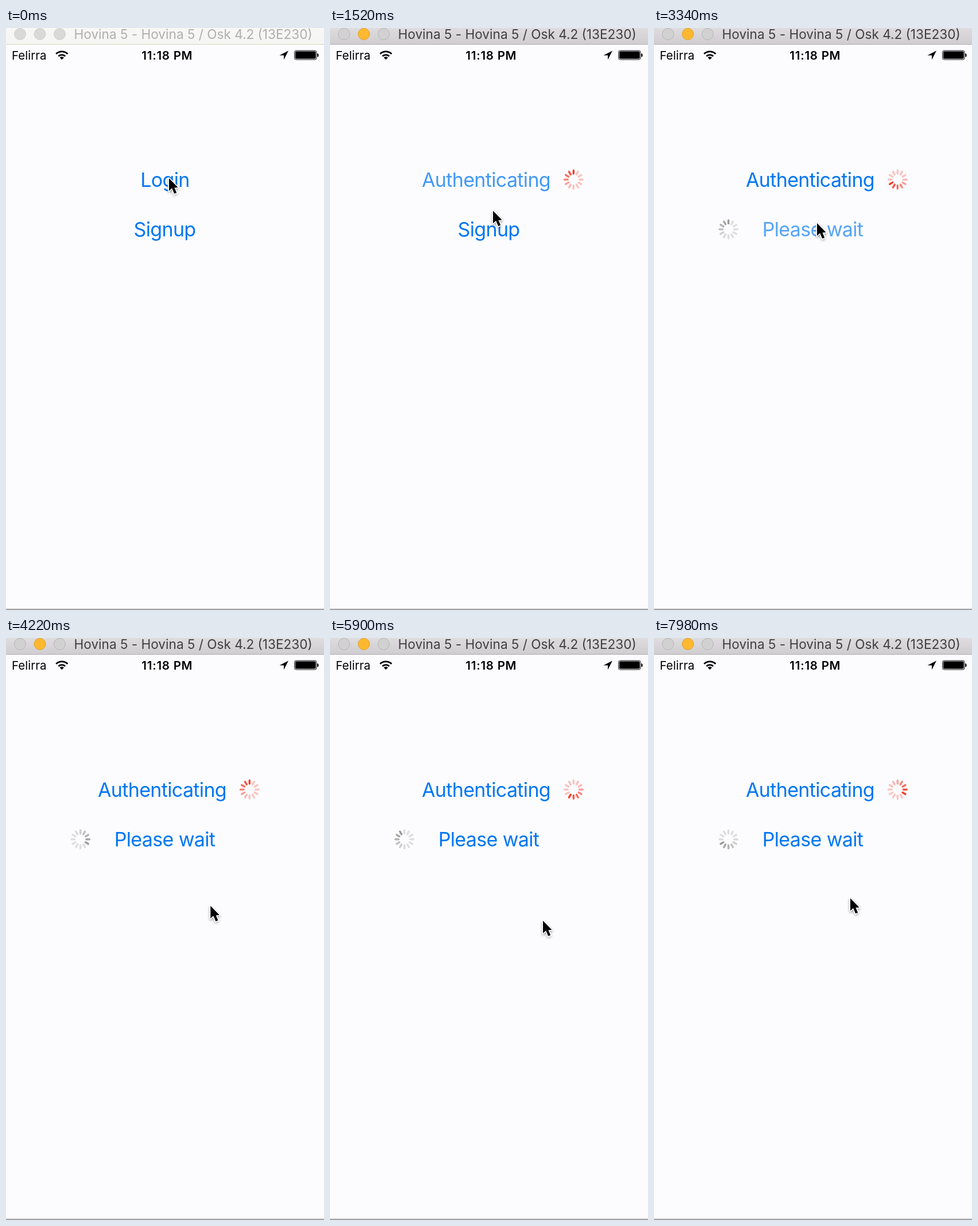
Animation of 554 by 1011 pixels, one loop 8000 ms. Source, as an HTML page with a canvas:

```html
<!DOCTYPE html>
<html lang="en">
<head>
<meta charset="utf-8">
<style>
  html, body { margin: 0; width: 100%; height: 100%; overflow: hidden; background: #fcfcff; }
  canvas { display: block; }
</style>
</head>
<body>
<canvas id="stage" width="554" height="1011"></canvas>
<script>
const ctx = document.getElementById('stage').getContext('2d');
const LOOP = 8000, FADE = 900, SPIN = 2750;
const LOGIN_TAP = 20, SIGNUP_TAP = 1895;
const BLUE = '#0076f2', BLACK = '#000', WHITE = '#fff';

const progress = (t, start, duration) => Math.min(1, Math.max(0, (t - start) / duration));
const smooth = p => p * p * (3 - 2 * p);
const easeOut = p => 1 - (1 - p) ** 3;

// The pointer slides from Login to Signup, drifts away, then returns a little.
function pointerAt(t) {
  const down = smooth(progress(t, 1220, 460));
  const away = easeOut(progress(t, 3600, 1390));
  const back = smooth(progress(t, 6060, 420));
  return [284 + 87 * away - 29 * back, 261 + 78 * down + 152 * away - 39 * back];
}

function label(text, x, y, size, color, { weight = 400, align = 'left', spacing = 0, alpha = 1 } = {}) {
  ctx.globalAlpha = alpha;
  ctx.font = `${weight} ${size}px Inter, Roboto, sans-serif`;
  ctx.letterSpacing = spacing + 'px';
  ctx.textAlign = align;
  ctx.fillStyle = color;
  ctx.fillText(text, x, y);
  ctx.globalAlpha = 1;
}

function roundRect(x, y, w, h, r) {
  ctx.beginPath();
  ctx.roundRect(x, y, w, h, r);
}

function titleBar(active) {
  const shade = ctx.createLinearGradient(0, 0, 0, 28);
  shade.addColorStop(0, active ? '#dedcde' : '#f7f7f6');
  shade.addColorStop(1, active ? '#cfcdd0' : '#f5f5f4');
  ctx.fillStyle = shade;
  ctx.fillRect(0, 0, 554, 28);
  ctx.fillStyle = active ? '#b0aeb2' : '#d6d6bc';
  ctx.fillRect(0, 28, 554, 1);

  for (let i = 0; i < 3; i++) {
    const lit = active && i === 1;
    ctx.beginPath();
    ctx.arc(24.5 + 34.5 * i, 10.5, 10, 0, 2 * Math.PI);
    ctx.fillStyle = lit ? '#fdb830' : active ? '#d2d1d2' : '#d9d9d8';
    ctx.fill();
    ctx.strokeStyle = lit ? '#e2a02c' : active ? '#b5b4b5' : '#cfcfce';
    ctx.lineWidth = 1;
    ctx.stroke();
  }
  label('Hovina 5 - Hovina 5 / Osk 4.2 (13E230)', 118.5, 19, 22.6, active ? '#403e40' : '#b0afab');
}

function wifi(x, y) {
  ctx.lineWidth = 2.8;
  ctx.lineCap = 'butt';
  for (let r = 2.6; r < 15; r += 5.8) {
    ctx.lineWidth = r < 3 ? 5.2 : 2.8;
    ctx.beginPath();
    ctx.arc(x, y, r, -0.75 * Math.PI, -0.25 * Math.PI);
    ctx.stroke();
  }
}

function locationArrow(x, y) {
  ctx.beginPath();
  ctx.moveTo(x, y);
  ctx.lineTo(x - 15.5, y + 8);
  ctx.lineTo(x - 8, y + 8);
  ctx.lineTo(x - 8, y + 15.5);
  ctx.fill();
}

function battery(x, y) {
  ctx.lineWidth = 0.9;
  roundRect(x, y, 38.6, 15.8, 3);
  ctx.stroke();
  roundRect(x + 1.4, y + 1.4, 35.8, 13, 1.8);
  ctx.fill();
  roundRect(x + 39.8, y + 5, 2.2, 6, [0, 2, 2, 0]);
  ctx.fill();
}

function statusBar() {
  label('Felirra', 10, 54.5, 20.5, BLACK);
  label('11:18 PM', 280.8, 54.5, 20.5, BLACK, { weight: 600, align: 'center', spacing: 0.75 });
  ctx.fillStyle = ctx.strokeStyle = BLACK;
  wifi(97.3, 55);
  locationArrow(492, 39.5);
  battery(502.5, 39.2);
}

function spinner(x, y, color, head) {
  ctx.strokeStyle = color;
  ctx.lineWidth = 3.4;
  ctx.lineCap = 'round';
  for (let age = 0; age < 12; age++) {
    const angle = (head - age) * Math.PI / 6 - Math.PI / 2;
    const c = Math.cos(angle), s = Math.sin(angle);
    ctx.globalAlpha = Math.max(0.3, 1 - age * 0.13);
    ctx.beginPath();
    ctx.moveTo(x + c * 10.2, y + s * 10.2);
    ctx.lineTo(x + c * 15.8, y + s * 15.8);
    ctx.stroke();
  }
  ctx.globalAlpha = 1;
}

// The old title fades out, then the new one fades in.
function button(t, tap, before, after, beforeX, afterX, y) {
  const gone = smooth(progress(t, tap, FADE));
  const shown = smooth(progress(t, tap + FADE, FADE));
  const style = { align: 'center', spacing: -0.65 };
  if (gone < 1) label(before, beforeX, y, 34, BLUE, { ...style, alpha: 1 - gone });
  else label(after, afterX, y, 34, BLUE, { ...style, alpha: shown });
}

// Arrow head with a slanted tail; the outline is the same shape drawn wider.
function arrow(color, grow) {
  ctx.fillStyle = ctx.strokeStyle = color;
  ctx.lineCap = 'butt';
  ctx.beginPath();
  ctx.moveTo(0, 0);
  ctx.lineTo(0, 22);
  ctx.lineTo(5.5, 16.8);
  ctx.lineTo(15.6, 16);
  ctx.closePath();
  ctx.fill();
  if (grow) {
    ctx.lineWidth = grow;
    ctx.stroke();
  }
  ctx.beginPath();
  ctx.moveTo(6, 14);
  ctx.lineTo(11.2 + grow * 0.2, 26 + grow * 0.45);
  ctx.lineWidth = 4.4 + grow;
  ctx.stroke();
}

function pointer(x, y) {
  ctx.save();
  ctx.translate(x, y);
  ctx.lineJoin = 'round';
  ctx.shadowColor = 'rgba(0,0,0,.3)';
  ctx.shadowBlur = 4;
  ctx.shadowOffsetY = 2;
  arrow(WHITE, 3);
  ctx.shadowColor = 'transparent';
  arrow(WHITE, 3);
  arrow(BLACK, 0);
  ctx.restore();
}

function draw(t) {
  ctx.fillStyle = '#fcfcff';
  ctx.fillRect(0, 0, 554, 1011);
  titleBar(t >= LOGIN_TAP);
  statusBar();

  button(t, LOGIN_TAP, 'Login', 'Authenticating', 277, 272, 275.5);
  button(t, SIGNUP_TAP, 'Signup', 'Please wait', 276.5, 276.5, 362);

  const head = Math.floor((t - 1520) * 12 / SPIN + 0.3);
  if (t >= LOGIN_TAP) spinner(424.3, 263.3, '#f63a26', head);
  if (t >= SIGNUP_TAP) spinner(129.7, 349.8, '#999996', head + 4);

  ctx.fillStyle = '#807f82';
  ctx.fillRect(0, 1009, 554, 1.5);
  pointer(...pointerAt(t));
}

const start = performance.now();
function tick() {
  draw((performance.now() - start) % LOOP);
  requestAnimationFrame(tick);
}
tick();
</script>
</body>
</html>
```
